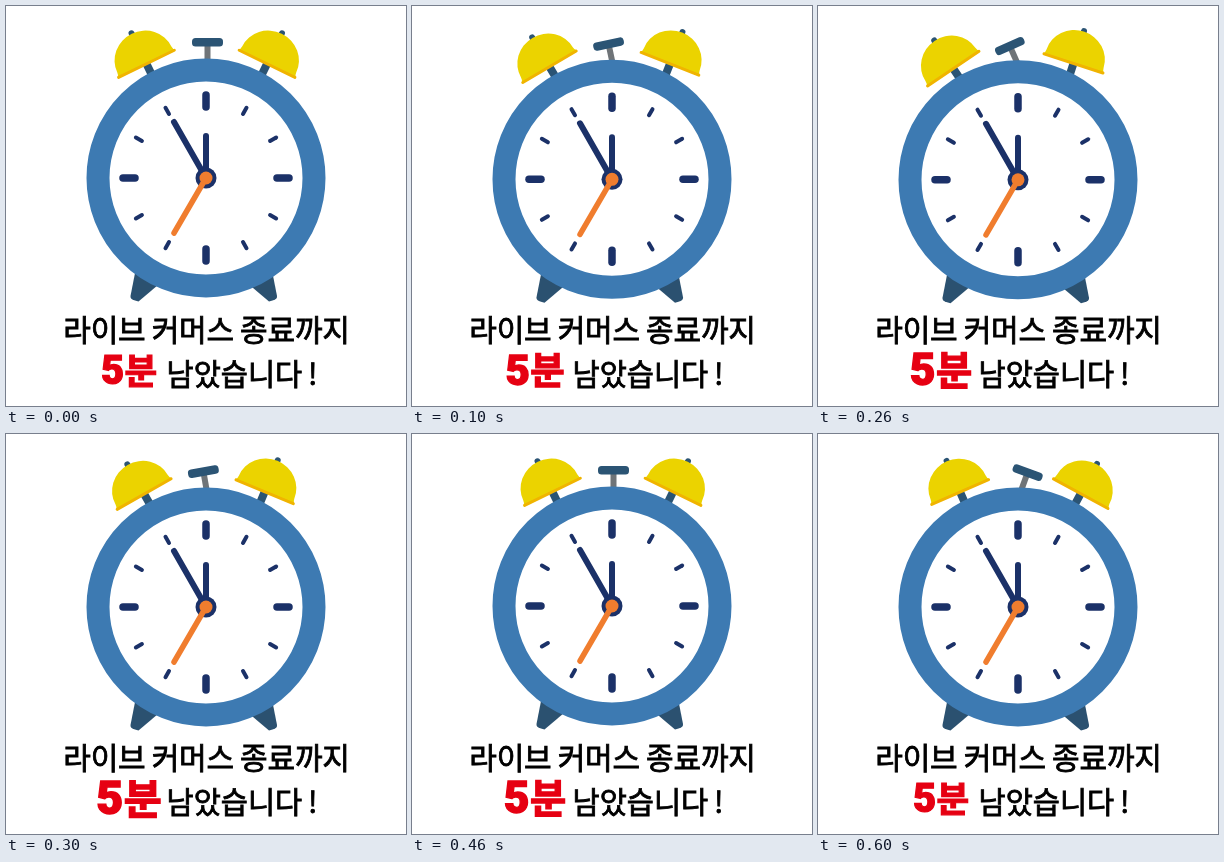
Write an HTML page that moves like this. It is 400 px wide and 400 px high and loops after 0.7 s.

```html
<!DOCTYPE html>
<html lang="ko">
<head>
<meta charset="utf-8">
<style>
  html, body { margin: 0; height: 100%; overflow: hidden; background: #fff; }
  svg { display: block; width: 100vw; height: 100vh; }
  text { font-family: "Noto Sans CJK KR", "Noto Sans CJK", sans-serif; }
  .line { stroke: #000; stroke-width: .8; }
  .red { fill: #e60012; stroke: #e60012; stroke-width: 1.2; font-weight: 900; }
  .hand, #ticks { stroke: #1b3168; stroke-linecap: round; }
</style>
</head>
<body>
<svg viewBox="0 0 400 400">
  <defs>
    <!-- origin is the point the bell swings about -->
    <g id="bell" stroke-linecap="round">
      <path d="M0-77V-70" stroke="#2b5474" stroke-width="6"/>
      <path d="M0-45V-20" stroke="#2b5474" stroke-width="8"/>
      <path d="M-32-43q2-2 2-5A30 28.500 0 0 1 30-48q0 3 2 5z" fill="#ebd300"/>
      <path d="M-31-43H31" stroke="#f0b400" stroke-width="3"/>
    </g>
    <path id="leg" d="M130 262L124.500 290Q124 293 129 294.500L132.500 295.500L152 279Z" fill="#2b5170"/>
  </defs>

  <g id="clock">
    <use id="left" href="#bell"/>
    <use id="right" href="#bell"/>
    <g id="hammer">
      <rect x="-3" y="-22" width="6" height="24" fill="#6f7478"/>
      <rect x="-15.5" y="-28" width="31" height="8.5" rx="3.5" fill="#2b5474"/>
    </g>
    <use href="#leg"/>
    <use href="#leg" transform="matrix(-1 0 0 1 395.500 0)"/>
    <circle cx="200" cy="172" r="108" fill="#fff" stroke="#3d7ab2" stroke-width="23"/>
    <g id="ticks"/>
    <path class="hand" d="M200 172V130" stroke-width="6"/>
    <path class="hand" d="M200 172L168 116" stroke-width="6"/>
    <circle cx="200" cy="172" r="10.5" fill="#1b3168"/>
    <path d="M200 172L168 227" stroke="#f07d2e" stroke-width="5.5" stroke-linecap="round"/>
    <circle cx="200" cy="172" r="6.5" fill="#f07d2e"/>
  </g>

  <text class="line" x="200.500" y="334.500" font-size="30" letter-spacing="-.2" word-spacing="-2" text-anchor="middle">라이브 커머스 종료까지</text>
  <g id="count" class="red">
    <text x="95" y="378" font-size="40" style="font-family:Roboto,sans-serif">5</text>
    <text x="118.500" y="377.500" font-size="35.500">분</text>
  </g>
  <text class="line" x="160.500" y="379.300" font-size="29.500">남았습니다</text>
  <text class="line" x="302" y="379.300" font-size="29.500">!</text>
</svg>

<script>
const $ = id => document.getElementById(id);
const move = (id, value) => $(id).setAttribute("transform", value);

// Long thick marks at the quarters, short thin ones between
let marks = "";
for (let h = 0; h < 12; h++) {
  const [from, to, width] = h % 3 ? [74, 81, 4] : [71, 83, 7.5];
  marks += `<path d="M200 ${172 - from}V${172 - to}" stroke-width="${width}" transform="rotate(${h * 30} 200 172)"/>`;
}
$("ticks").innerHTML = marks;

const swing = [0, -4.5, -8, -3.5, 0, 4.5, 2.5];
const tilt = [0, -12, -24, -10, 0, 10, 20];
const drop = [0, 1.3, 1.8, 1, 0, 1.5, 1];

function draw(now) {
  const i = Math.floor(now / 100) % 7;
  move("clock", `translate(0 ${drop[i]})`);
  move("left", `translate(159.300 96.500) rotate(${swing[i] - 26})`);
  move("right", `translate(242.200 96.500) rotate(${swing[i] + 26})`);
  move("hammer", `translate(201.500 60) rotate(${tilt[i]})`);
  const scale = 1 + .055 * (3 - Math.abs(3 - i));
  move("count", `translate(123.300 364.500) scale(${scale}) translate(-123.300 -364.500)`);
}

const start = performance.now();
function loop() {
  draw(performance.now() - start);
  requestAnimationFrame(loop);
}
loop();
</script>
</body>
</html>
```
